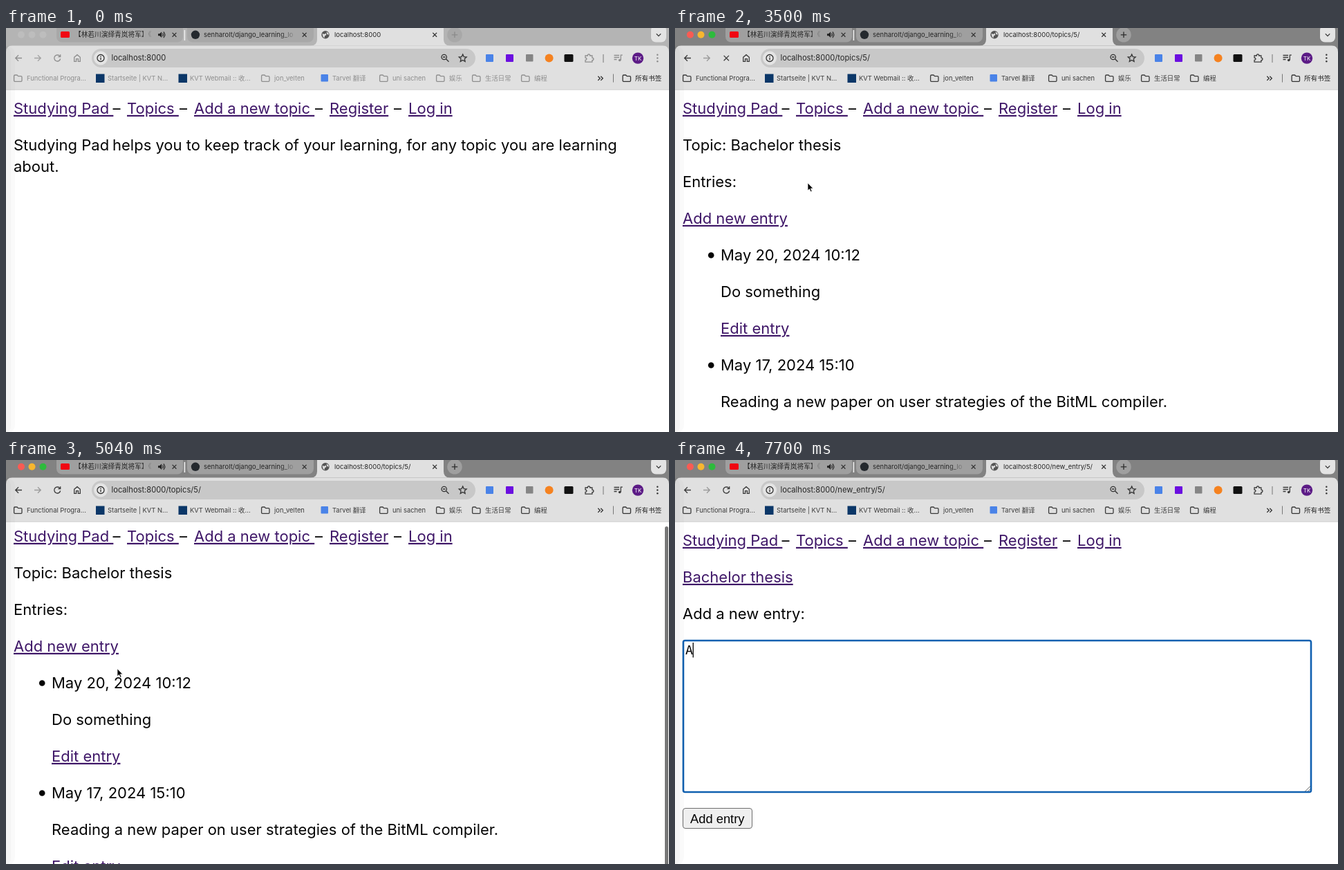
Animation, 959 px wide and 584 px high, one loop 8000 ms. Source, as an HTML page:

```html
<!DOCTYPE html>
<html lang="en">
<head>
<meta charset="utf-8">
<title>Browser session</title>
<style>
html, body { margin: 0; width: 100%; height: 100%; overflow: hidden; background: #fff; }
svg { display: block; width: 959px; height: 584px;
  --strip: #828282; --pill: #9f9f9f; --ink: #3b3b3b; --off: #9b9b9b; --plus: #2c2c2c; }
svg.idle { --strip: #b4b4b4; --pill: #a8a8a8; --ink: #8e8e8e; --off: #a4a4a4; --plus: #8a8a8a; }
text { font-family: Inter, "Noto Sans CJK SC", "Noto Sans CJK JP", sans-serif; white-space: pre; fill: #262626; }
.ink { fill: var(--ink); }
.page text { font-size: 22px; fill: #050505; }
.page .link { fill: #3f1768; text-decoration: underline; text-decoration-thickness: 1.6px; }
.page .mono { font: 18.33px "DejaVu Sans Mono", monospace; }
.page .btn { font: 18.33px "Liberation Sans", Arial, sans-serif; }
.line { fill: none; stroke: #333; stroke-width: 1.3; }
.line.ink { fill: none; stroke: var(--ink); }
.idle .lamp { fill: #bdbdbd; }
</style>
</head>
<body>
<svg id="stage" viewBox="0 0 959 584" xmlns="http://www.w3.org/2000/svg"></svg>
<script>
const LOOP = 8000, STEP = 70;
const stage = document.getElementById('stage');

const text = (x, y, s, size = '', cls = '') =>
  `<text x="${x}" y="${y}" class="${cls}"${size && ` font-size="${size}"`}>${s}</text>`;
const line = (d, cls = '', extra = '') => `<path d="${d}" class="line ${cls}" ${extra}/>`;
const rect = (x, y, w, h, fill, r = 0, extra = '') =>
  `<rect x="${x}" y="${y}" width="${w}" height="${h}" rx="${r}" fill="${fill}" ${extra}/>`;
const dot = (x, y, r, fill, extra = '') => `<circle cx="${x}" cy="${y}" r="${r}" fill="${fill}" ${extra}/>`;
const cross = (x, y, r, cls) =>
  line(`M${x - r} ${y - r}l${2 * r} ${2 * r}m0 ${-2 * r}l${-2 * r} ${2 * r}`, cls);
const folder = (x, cls = 'ink') =>
  line(`M${x + .6} 69.4q0 -1.4 1.4 -1.4h3l1.6 1.6h4q1.4 0 1.4 1.4v5q0 1.4 -1.4 1.4h-8.6q-1.4 0 -1.4 -1.4z`, cls);

// Window frame
function tabs() {
  return rect(0, 0, 959, 40, 'var(--strip)') +
    [['#fa5b53', 22], ['#f8b62f', 37.5], ['#2dbb3c', 53.5]].map(([c, x]) => dot(x, 9.8, 5, c, 'class="lamp"')).join('') +
    rect(73, -10, 183, 30.5, 'var(--pill)', 8) + rect(262, -10, 183, 30.5, 'var(--pill)', 8) +
    rect(79, 5, 13, 9, '#f00612', 1.5) +
    text(99, 13.3, '【林若川演绎青岚将军】《', 9.7) +
    rect(190, 2, 25, 16, 'url(#fade)') +
    '<path d="M220 8.3h2.2l3 -2.7v8.4l-3 -2.7h-2.2z" fill="#222"/>' +
    line('M226.5 7.6q2 2.2 0 4.4M227.8 5.5q4 4.3 0 8.6') +
    cross(243.5, 9.8, 2.9) + rect(257.6, 3, 1.6, 15, '#eee') +
    dot(274, 9.8, 6.2, '#24292e') +
    text(286, 13, 'senharolt/django_learning_lo', 9.5) +
    rect(395, 2, 25, 16, 'url(#fade2)') + cross(431.7, 9.8, 2.9) +
    '<path d="M441 25.5q9 0 9 -9v-17h183v17q0 9 9 9z" fill="#e0e0e0"/>' +
    dot(462, 9.8, 5.7, '#555') +
    '<path d="M457.5 8l3 1 2 -1.5 1 2.5 -2.5 1.5 -.5 3 -2 -2zM463.5 5.5l3 1.8v3l-2.2 -1.6z" fill="#ddd"/>' +
    text(475, 13, '', 9.5, 'title') + cross(620.2, 9.8, 2.9) +
    dot(649, 9.8, 10.8, 'var(--pill)') +
    line('M644.8 9.8h8.4M649 5.6v8.4', '', 'style="stroke:var(--plus)"') +
    rect(933, -4, 22, 24.5, '#e3e3e3', 7) + line('M940.8 8.4l3.2 3.2 3.2 -3.2');
}

function toolbar() {
  const dots = [38.8, 43.5, 48.2].map(y => dot(942.3, y, 1.25, 'var(--ink)')).join('');
  return '<path d="M0 89V35q0 -9.5 9 -9.5H950q9 0 9 9.5V89z" fill="#e0e0e0"/>' +
    rect(0, 88.8, 959, 1, '#c6c6c6') +
    line('M23 43.5H14M18 39.2l-4.3 4.3 4.3 4.3', 'ink') +
    line('M41 43.5H50M46 39.2l4.3 4.3 -4.3 4.3', '', 'style="stroke:var(--off)"') +
    `<g class="reload">${line('M78 40.9a4.5 4.5 0 1 0 .7 3.6M78.7 38.3v3.3h-3.3', 'ink')}</g>` +
    `<g class="stop">${cross(74.3, 43.6, 3.7, 'ink')}</g>` +
    line('M98.7 42.3l4.3 -3.6 4.3 3.6v6h-2.9v-3.6h-2.8v3.6h-2.9z', 'ink') +
    rect(124, 30, 555, 27, '#c8c8c8', 13.5) + dot(137, 43.5, 10, '#e4e4e4') +
    dot(137, 43.5, 5, 'none', 'class="line"') + rect(136.4, 42.8, 1.2, 3.4, '#222') + dot(137, 41.2, .8, '#222') +
    text(152.5, 47.3, '', 11.15, 'url') +
    dot(633.7, 42, 3.7, 'none', 'class="line"') + line('M636.5 44.8l4 4M632 42h3.4') +
    line('M660.7 38l1.6 3.6 3.9 .4 -2.9 2.6 .8 3.8 -3.4 -2 -3.4 2 .8 -3.8 -2.9 -2.6 3.9 -.4z') +
    rect(694, 38, 11, 11, '#4a83e8', 1) + rect(723, 38, 11, 11, '#6b0fe0', 1) +
    rect(752, 38, 10.5, 10.5, '#858585', 1) + dot(785.6, 43.6, 6, '#f58220') +
    rect(807.5, 38, 13, 11, '#111', 1.5) +
    line('M838 40h3.3q0 -2.2 1.7 -2.2t1.7 2.2h3.2v3.2q2 0 2 1.7t-2 1.7v2.5h-9.9v-2.8q2 -.2 2 -1.7t-2 -1.6z', 'ink') +
    rect(863.5, 38, 1, 12, '#777') +
    line('M879.5 39.5h7.5M879.5 42.5h7.5M879.5 45.5h4M889.3 46.5v-7.3h2.5', 'ink') +
    dot(887.7, 46.5, 1.8, 'var(--ink)') +
    dot(914, 43.6, 8.2, '#5c1b86') +
    '<text x="914" y="46.5" font-size="8" text-anchor="middle" style="fill:#fff">TK</text>' + dots;
}

function bookmarks() {
  const items = [[30, 'Functional Progra...'], [147, 'Startseite | KVT N...'], [266, 'KVT Webmail :: 收...'],
    [388, 'jon_velten'], [472, 'Tarvel 翻译'], [559, 'uni sachen'], [641, '娱乐'], [693, '生活日常'], [764, '编程']];
  return [11, 369, 540, 622, 674, 745].map(x => folder(x)).join('') +
    items.map(([x, s]) => text(x, 76, s, 9.4, 'ink')).join('') +
    rect(130, 66.5, 12.5, 12.5, '#0b3768') + rect(249.5, 66.5, 12.5, 12.5, '#0b3768') +
    rect(455.5, 67, 10.5, 10.5, '#4a83e8', 1) +
    line('M856.3 69.8l3 3 -3 3M860.3 69.8l3 3 -3 3') + rect(878, 66.5, 1, 12, '#777') +
    folder(891.5, '') + text(910, 76, '所有书签', 9.6);
}

// Pages
const row = n => 123.8 + 53 * n;
const link = (x, y, s) => text(x, y, s, '', 'link');
const bullet = y => dot(52.2, y - 7.3, 4.3, '#050505');

function nav() {
  const links = [[11, 'Studying Pad '], [175, 'Topics '], [272, 'Add a new topic '], [468, 'Register'], [582, 'Log in']];
  return links.map(([x, s]) => link(x, row(0), s)).join('') +
    [154.5, 251, 447, 561].map(x => text(x, row(0), '–')).join('');
}

function entry(n, date, body) {
  return bullet(row(n)) + text(66, row(n), date) + text(66, row(n + 1), body) + link(66, row(n + 2), 'Edit entry');
}

const pages = [
  { from: 0, path: '', html: text(11, row(1), 'Studying Pad') +
    text(154, row(1), 'helps you to keep track of your learning, for any topic you are learning') +
    text(11, row(1) + 31, 'about.') },
  { from: 2100, path: '/topics/', busy: 70, html: text(11, row(1), 'Topics') +
    ['Bachelor thesis', 'Python', 'German', 'Cooking', 'Chess'].map((s, i) =>
      bullet(row(2) + 31 * i) + link(66, row(2) + 31 * i, s)).join('') },
  { from: 3500, path: '/topics/5/', busy: 140, html: text(11, row(1), 'Topic: Bachelor thesis') +
    text(11, row(2), 'Entries:') + link(11, row(3), 'Add new entry') +
    entry(4, 'May 20, 2024 10:12', 'Do something') +
    entry(7, 'May 17, 2024 15:10', 'Reading a new paper on user strategies of the BitML compiler.') },
  { from: 6160, path: '/new_entry/5/', busy: 70, html: link(11, row(1), 'Bachelor thesis') +
    text(11, row(2), 'Add a new entry:') +
    rect(12, 261, 908, 219, '#fff', 2.5, 'class="box"') +
    line('M911.5 479l7.5 -7.5M915.5 479l3.5 -3.5', '', 'style="stroke-width:.8"') +
    text(15, 281, 'A', '', 'mono') + rect(25.6, 264, 1.3, 21.5, '#000', 0, 'class="caret"') +
    rect(11.5, 503.5, 100, 29, '#efefef', 3.5, 'stroke="#6f6f6f"') + text(22, 525, 'Add entry', '', 'btn') }
];

const pointers = {
  arrow: '<path d="M0 0V11L2.5 8.7 4.3 12.7 6.1 11.9 4.4 8H7.8Z" fill="#000" stroke="#fff" stroke-width=".7"/>',
  hand: '<path d="M-1.5 8V.6q0 -1.3 1.2 -1.3t1.2 1.3V5q2 -.8 2.4 .6 1.8 -.6 2.2 .8 2 -.4 2 1.4v3q0 2 -1.5 4h-5.5q-1 -2 -4.3 -5.3 -1 -1.5 .3 -2 1 -.2 2 .8z" fill="#fff" stroke="#000"/>',
  beam: '<path d="M-2.5 -8.5q2.5 0 2.5 1.5 0 -1.5 2.5 -1.5M0 -7V7M-2.5 8.5q2.5 0 2.5 -1.5 0 1.5 2.5 1.5M-1.5 1.5h3" fill="none" stroke="#222"/>'
};

const fade = (id, x) => `<linearGradient id="${id}" gradientUnits="userSpaceOnUse" x1="${x}" x2="${x + 23}">
  <stop offset="0" style="stop-color:var(--pill);stop-opacity:0"/><stop offset="1" style="stop-color:var(--pill)"/></linearGradient>`;

stage.innerHTML = `<defs>${fade('fade', 192)}${fade('fade2', 397)}
  <clipPath id="view"><rect y="89.8" width="959" height="495"/></clipPath></defs>
  ${tabs()}${toolbar()}${bookmarks()}
  <g clip-path="url(#view)"><rect y="89" width="959" height="500" fill="#fff"/>
  <g class="page" id="scroll">${nav()}${pages.map(p => `<g class="body">${p.html}</g>`).join('')}</g></g>
  ${rect(-20, 26, 33, 560, '#000', 12, 'opacity=".02"')}${rect(-20, 26, 27, 560, '#000', 10, 'opacity=".025"')}
  ${rect(953, 96, 5, 500, '#777', 2.5, 'id="bar"')}
  <g id="cursor">${Object.keys(pointers).map(k => `<g class="${k}">${pointers[k]}</g>`).join('')}</g>`;

// Motion tables: time, then values
const path = [
  [350, 372, 520], [490, 157, 246], [630, 157, 246], [840, 112, 200], [910, 106, 165], [1050, 150, 128], [1260, 208, 113],
  [2450, 208, 113], [2520, 190, 150], [2660, 105, 262], [2730, 118, 274], [2870, 190, 232], [3010, 190, 232], [3220, 192, 224],
  [3920, 192, 224], [4130, 173, 296], [4550, 173, 296], [4830, 173, 300], [4970, 173, 300], [5180, 137, 305],
  [5390, 134, 300], [5530, 137, 305], [5740, 128, 280], [5950, 124, 266], [6510, 124, 266], [6720, 131, 302]
];
const scroll = [[4340, 0], [4550, -10], [4760, -10], [4830, -9], [5110, -5]];
const shapes = [[0, 'arrow'], [1820, 'hand'], [2520, 'arrow'], [2870, 'hand'], [3500, 'arrow'],
  [5740, 'hand'], [6160, 'arrow'], [6580, 'beam']];

function ease(table, t) {
  const i = table.findIndex(k => k[0] > t);
  if (i === 0) return table[0].slice(1);
  if (i < 0) return table[table.length - 1].slice(1);
  const a = table[i - 1], b = table[i], f = (t - a[0]) / (b[0] - a[0]);
  return a.slice(1).map((v, j) => v + (b[j + 1] - v) * f);
}

const $ = s => stage.querySelector(s);
const show = (el, on) => { el.style.display = on ? '' : 'none'; };
const bodies = stage.querySelectorAll('.body');
const [title, url, reload, stop, box, caret, letter, bar, cursor, view] =
  ['.title', '.url', '.reload', '.stop', '.box', '.caret', '.mono', '#bar', '#cursor', '#scroll'].map($);

function draw(time) {
  const t = Math.floor(time / STEP) * STEP;
  const n = pages.filter(p => p.from <= t).length - 1, page = pages[n];
  stage.setAttribute('class', t < 1470 ? 'idle' : '');
  bodies.forEach((b, i) => show(b, i === n));
  title.textContent = url.textContent = 'localhost:8000' + page.path;
  const busy = t < page.from + (page.busy || 0);
  show(stop, busy);
  show(reload, !busy);

  const dy = n === 2 ? Math.round(ease(scroll, t)[0]) : 0;
  view.setAttribute('transform', `translate(0 ${dy})`);
  show(bar, t >= 4410 && t < 5180);

  const focus = t >= 6930, typed = t >= 7700;
  box.setAttribute('stroke', focus ? '#1060b0' : '#767676');
  box.setAttribute('stroke-width', focus ? 2.6 : 1.2);
  show(letter, typed);
  show(caret, typed || (focus && t < 7490));
  caret.setAttribute('x', typed ? 25.6 : 15);

  const [x, y] = ease(path, t);
  const shape = shapes.filter(s => s[0] <= t).pop()[1];
  cursor.setAttribute('transform', `translate(${x} ${y})`);
  show(cursor, t >= 350 && !typed);
  for (const g of cursor.children) show(g, g.getAttribute('class') === shape);
}

const start = performance.now();
function tick() {
  draw((performance.now() - start) % LOOP);
  requestAnimationFrame(tick);
}
tick();
</script>
</body>
</html>
```
